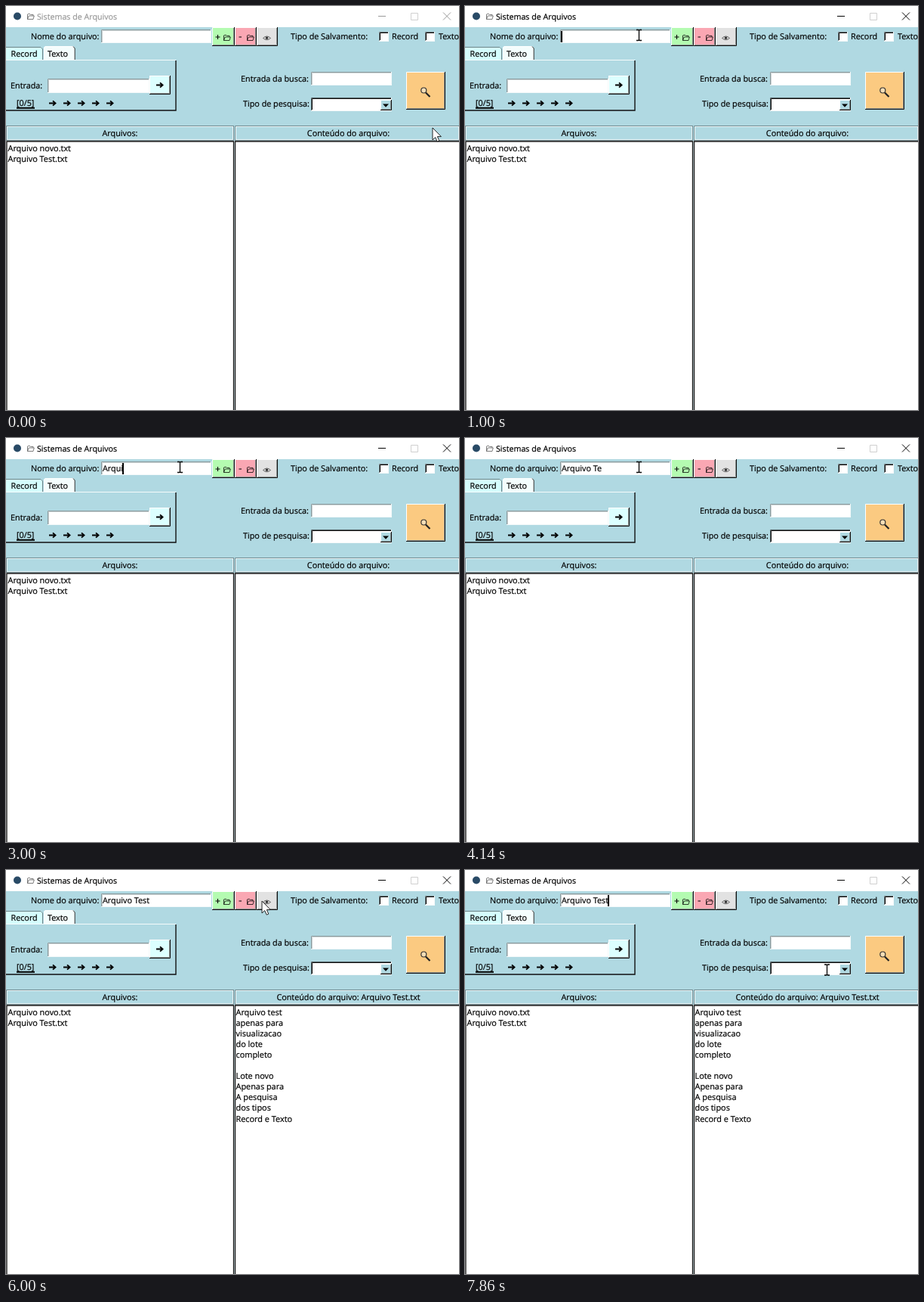
Recreate the animation shown at these times as an HTML page. Size 600 by 534 pixels, loop 8000 ms.

```html
<!DOCTYPE html>
<html lang="pt">
<head>
<meta charset="utf-8">
<title>Sistemas de Arquivos</title>
<style>
  html, body { margin: 0; width: 100%; height: 100%; overflow: hidden; background: #b0d9e2; }
  svg { display: block; width: 600px; height: 534px; }
  text {
    font: 10.8px "Open Sans", "Noto Sans", sans-serif; text-rendering: geometricPrecision; white-space: pre;
    fill: currentColor; stroke: currentColor; stroke-width: .2px;
  }
</style>
</head>
<body>
<svg id="stage" viewBox="0 0 600 534">
  <defs>
    <path id="folder" d="M.5 7.5V1L1.3 .5H3.6L4.5 1.4H8V2.9M.5 7.5L2.2 3H9.3L8 7.5Z"
      fill="none" stroke="currentColor" stroke-width=".75"/>
    <path id="next" d="M0 0H8M5 -3.2L8.6 0L5 3.2" fill="none" stroke="#000" stroke-width="1.8"/>
  </defs>
  <g id="ui"></g>
  <text id="typed" x="128" y="44"></text>
  <rect id="caret" y="33" width="2" height="15"/>
  <text id="heading" x="453.5" y="172" text-anchor="middle"></text>
  <g id="content"></g>
  <path id="arrow" d="M0 0V16L3.7 12.6 6.2 18.2 8.8 17.1 6.4 11.6H11.4Z" fill="#fff" stroke="#111" stroke-width=".9"/>
  <g id="beam" fill="none">
    <path d="M0 -6V6" stroke="#fff" stroke-width="3"/>
    <path d="M-3.5 -7H-1L0 -6.2 1 -7H3.5M0 -6.5V6.5M-3.5 7H-1L0 6.2 1 7H3.5" stroke="#000" stroke-width="1.3"/>
  </g>
</svg>
<script>
const $ = id => document.getElementById(id);

const rect = (x, y, w, h, fill) => `<rect x="${x}" y="${y}" width="${w}" height="${h}" fill="${fill}"/>`;
const line = (d, color = '#000', width = 1) => `<path d="${d}" fill="none" stroke="${color}" stroke-width="${width}"/>`;
const label = (x, y, str, extra = '') => `<text x="${x}" y="${y}" ${extra}>${str}</text>`;
const use = (id, x, y, extra = '') => `<use href="#${id}" x="${x}" y="${y}" ${extra}/>`;

// Box with one colour on the top and left edges and another on the right and bottom.
const bevel = (x, y, w, h, fill, light, dark) => {
  const l = x + .5, t = y + .5, r = x + w - .5, b = y + h - .5;
  return rect(x, y, w, h, fill) + line(`M${l} ${b}V${t}H${r}`, light) + line(`M${x} ${b}H${r}V${y}`, dark);
};
const raised = (x, y, w, h, fill) =>
  bevel(x, y, w, h, fill, '#fff', '#111') + line(`M${x + 1} ${y + h - 1.5}H${x + w - 1.5}V${y + 1}`, '#8a9292');
const entry = (x, y, w, h) =>
  bevel(x, y, w, h, '#fff', '#8b9a9d', '#f4f9fa') + line(`M${x + 1.5} ${y + h - 1}V${y + 1.5}H${x + w - 1}`, '#c9d2d4');
const checkbox = (x, y) =>
  bevel(x, y, 13, 13, '#fff', '#6f7b7e', '#f4f9fa') + line(`M${x + 1.5} ${y + 11}V${y + 1.5}H${x + 12}`);
const header = (x, w) =>
  bevel(x, 158, w, 20, '#b0d9e2', '#728b91', '#728b91') + bevel(x + 1, 159, w - 2, 18, '#b0d9e2', '#eaf6f8', '#eaf6f8');
const list = (x, w) => rect(x, 178, w, 357, '#fff') + line(`M${x + 1} 534V179H${x + w - .5}V534`, '#111', 1.3);
const rows = (x, items) => items.map((s, i) => label(x, 191.5 + 14.1 * i, s, 'style="font-size:10.9px"')).join('');

$('ui').innerHTML = [
  rect(0, 0, 600, 28, '#fff'),
  '<circle cx="15" cy="13.5" r="5" fill="#294a66"/>',
  '<g id="titlebar">',
  use('folder', 28, 10, 'style="color:#555"'),
  label(41, 18, 'Sistemas de Arquivos', 'style="font-size:10.7px"'),
  line('M493 13.5H503M579 8.5L589 18.5M589 8.5L579 18.5', 'currentColor'),
  '</g>',
  line('M536.5 9.5H545.5V18.5H536.5Z', '#d0d0d0'),

  label(33, 44, 'Nome do arquivo:'),
  entry(126, 31, 146, 18),
  raised(273, 28, 30, 25, '#b4fbb1'),
  line('M277.5 41H283.5M280.5 38V44'), use('folder', 288, 38),
  raised(303, 28, 29, 25, '#faa7b3'),
  line('M308.5 41H312'), use('folder', 319, 38),
  raised(332, 28, 28, 25, '#e2e2e2'),
  line('M340.5 42.5Q345.5 37.5 350.5 42.5Q345.5 47 340.5 42.5Z', '#444', .8),
  '<circle cx="345.5" cy="42.3" r="1.7" fill="#333"/>',
  label(377, 44, 'Tipo de Salvamento:'),
  checkbox(494, 34), label(511, 44, 'Record'),
  checkbox(555, 34), label(573, 44, 'Texto'),

  '<path d="M0 72V54H46L48 56V72Z" fill="#d5fdfd"/>',
  line('M0 54.5H46L48.5 57V72', '#6d8488'),
  '<path d="M50 72V55L52 53H89L91 55V72Z" fill="#f4fdfd"/>',
  line('M50.5 72V55L52 53.5H89', '#fff'),
  line('M89 53.5L91.2 56V72', '#333'),
  label(6.5, 67, 'Record'), label(55, 67, 'Texto'),
  line('M0 71.5H225', '#f4fbfc'),
  line('M0 138H225V72', '#111', 1.4),
  label(6, 109, 'Entrada:'),
  entry(55, 96, 135, 19),
  raised(190, 92, 28, 25, '#dcffff'),
  use('next', 199, 104.5),
  label(14, 132, '[0/5]'),
  line('M14 134.8H38', '#000', 2),
  [57, 76, 95, 114, 133].map(x => use('next', x, 128.5)).join(''),

  label(311, 100, 'Entrada da busca:'),
  entry(404, 87, 107, 18),
  label(314, 133, 'Tipo de pesquisa:'),
  bevel(404, 121, 107, 18, '#fff', '#4b5a5e', '#f4f9fa'),
  line('M405.5 137V122.5H510', '#111'),
  raised(496, 124, 15, 14, '#b0d9e2'),
  '<path d="M499 129.5H507L503 133.7Z"/>',
  raised(530, 87, 52, 50, '#fbca81'),
  line('M556 114.5L561.5 120', '#222', 2.2),
  '<circle cx="553.3" cy="111.5" r="3.5" fill="#f7deb6" stroke="#333" stroke-width="1.2"/>',

  header(0, 302), header(303, 298),
  label(151, 172, 'Arquivos:', 'text-anchor="middle"'),
  list(0, 302), list(302.5, 300),
  rows(2.5, ['Arquivo novo.txt', 'Arquivo Test.txt'])
].join('');

$('content').innerHTML = rows(304.5, [
  'Arquivo test', 'apenas para', 'visualizacao', 'do lote', 'completo', '',
  'Lote novo', 'Apenas para', 'A pesquisa', 'dos tipos', 'Record e Texto'
]);

const LOOP = 8000, STEP = 1000 / 7;
const FOCUS = 625, TYPE_START = 2000, TYPE_STEP = 225, OPEN = 5400;
const fileName = 'Arquivo Test';
// Pointer stops: time, x, y
const stops = [
  [0, 565, 161], [100, 565, 161], [580, 230.5, 38.5], [4700, 230.5, 38.5], [5250, 339, 41],
  [6080, 339, 41], [6860, 414, 293], [7200, 414, 293], [7800, 479.5, 132], [LOOP, 479.5, 132]
];

function pointerAt(t) {
  const i = stops.findIndex(s => s[0] > t);
  const [t0, x0, y0] = stops[i - 1], [t1, x1, y1] = stops[i];
  const p = (t - t0) / (t1 - t0), k = p * p * (3 - 2 * p);
  return [x0 + (x1 - x0) * k, y0 + (y1 - y0) * k];
}

const inside = (x, y, l, t, r, b) => x > l && x < r && y > t && y < b;
const show = (id, on) => $(id).setAttribute('visibility', on ? 'visible' : 'hidden');

function draw(t) {
  const [x, y] = pointerAt(t);
  const overText = inside(x, y, 126, 31, 272, 49) || inside(x, y, 404, 87, 511, 105) || inside(x, y, 404, 121, 496, 139);
  for (const id of ['arrow', 'beam']) $(id).setAttribute('transform', `translate(${x} ${y})`);
  show('arrow', !overText);
  show('beam', overText);

  const count = Math.max(0, Math.floor((t - TYPE_START) / TYPE_STEP) + 1);
  $('typed').textContent = fileName.slice(0, count);
  $('caret').setAttribute('x', 127 + (count ? $('typed').getComputedTextLength() : 0));
  show('caret', t >= FOCUS && (t - FOCUS) % 900 < 600);

  $('titlebar').style.color = t >= FOCUS ? '#000' : '#999';
  $('heading').textContent = 'Conteúdo do arquivo:' + (t >= OPEN ? ' Arquivo Test.txt' : '');
  show('content', t >= OPEN);
}

// The picture holds for seventh-of-a-second steps, rounded to 10 ms.
const start = performance.now();
function tick() {
  const t = (performance.now() - start) % LOOP;
  draw(Math.floor((t + 5) / STEP) * STEP % LOOP);
  requestAnimationFrame(tick);
}
tick();
</script>
</body>
</html>
```
